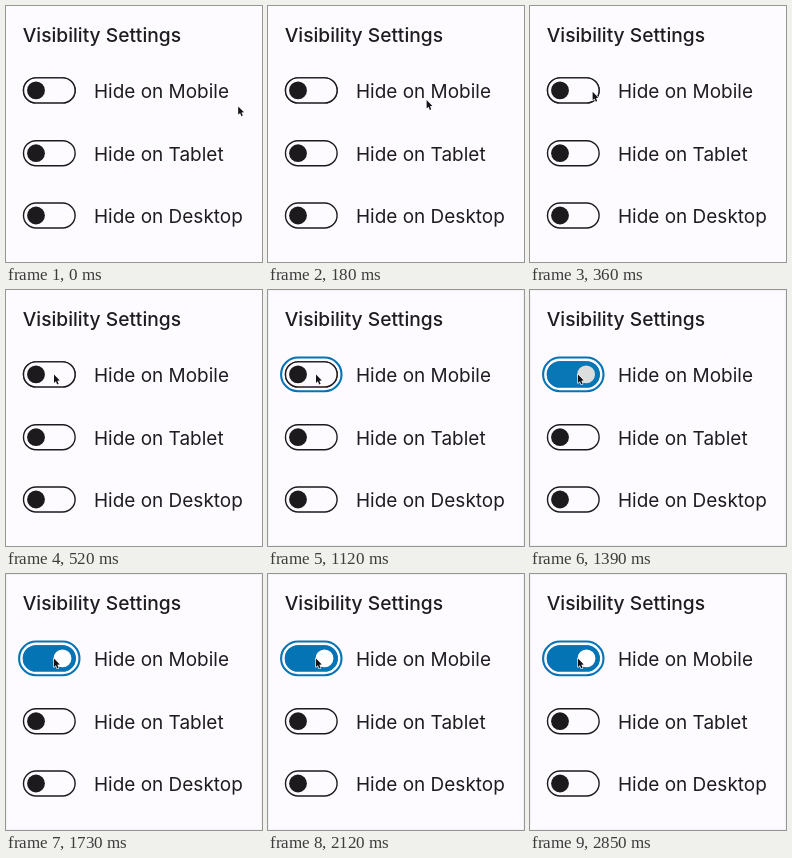
Recreate the animation shown at these times as an HTML page with a canvas. Size 256 by 256 pixels, loop 2.88 s.

```html
<!DOCTYPE html>
<html lang="en">
<head>
<meta charset="utf-8">
<title>Visibility Settings</title>
<style>
  html, body { margin: 0; width: 100%; height: 100%; overflow: hidden; background: #fdfbff; }
  svg, canvas { position: absolute; left: 0; top: 0; width: 100vw; height: 100vh; display: block; }
  text { font: 400 18.98px Inter, sans-serif; font-optical-sizing: none; fill: #1e1c1f; }
  .title { font-weight: 500; font-size: 19.2px; }
</style>
</head>
<body>
<svg viewBox="0 0 256 256">
  <text class="title" x="16.7" y="36">Visibility Settings</text>
  <text x="88" y="91.8">Hide on Mobile</text>
  <text x="88" y="154.8">Hide on Tablet</text>
  <text x="88" y="217">Hide on Desktop</text>
</svg>
<canvas id="stage"></canvas>
<script>
const LOOP = 2880, PRESS = 1110;
const PAPER = [253, 251, 255], INK = [29, 26, 30], BLUE = [5, 116, 180], WHITE = [255, 255, 255];
const LEFT = 16.8, WIDTH = 53, HEIGHT = 26.4;

const canvas = document.getElementById('stage');
const ctx = canvas.getContext('2d');
const dpr = window.devicePixelRatio || 1;
canvas.width = canvas.height = 256 * dpr;

const progress = (t, start, length) => Math.min(1, Math.max(0, (t - start) / length));
const lerp = (a, b, k) => a + (b - a) * k;
const mix = (a, b, k) => `rgb(${a.map((v, i) => Math.round(lerp(v, b[i], k)))})`;

// cubic-bezier(.25, .1, .25, 1)
function ease(x) {
  let lo = 0, hi = 1, p = x;
  for (let i = 0; i < 20; i++) {
    p = (lo + hi) / 2;
    const q = 1 - p;
    if (0.75 * p * q * q + 0.75 * p * p * q + p * p * p < x) lo = p;
    else hi = p;
  }
  const q = 1 - p;
  return 0.3 * p * q * q + 3 * p * p * q + p * p * p;
}

function strokePill(cy, grow, color, width) {
  const h = HEIGHT + 2 * grow;
  ctx.beginPath();
  ctx.roundRect(LEFT - grow, cy - h / 2, WIDTH + 2 * grow, h, h / 2);
  ctx.strokeStyle = color;
  ctx.lineWidth = width;
  ctx.stroke();
}

function toggle(cy, slide = 0, tint = 0, focused = false) {
  if (focused) strokePill(cy, 3.7, `rgb(${BLUE})`, 2.1);
  strokePill(cy, -0.7, mix(INK, BLUE, slide), 1.4);
  if (slide > 0) {
    ctx.fillStyle = mix(PAPER, BLUE, slide);
    ctx.fill();
    ctx.stroke();
  }

  ctx.beginPath();
  ctx.arc(lerp(30, 56.5, slide), cy, 8.9, 0, Math.PI * 2);
  ctx.fillStyle = mix(INK, WHITE, tint);
  ctx.fill();
}

function cursor(x, y) {
  const arrow = [[0, 0], [0, 8.4], [1.9, 6.7], [3.2, 9.8], [4.6, 9.2], [3.3, 6.1], [5.8, 5.9]];
  ctx.beginPath();
  for (const [dx, dy] of arrow) ctx.lineTo(x + dx, y + dy);
  ctx.closePath();
  ctx.lineJoin = 'round';
  ctx.lineWidth = 1.3;
  ctx.strokeStyle = '#fff';
  ctx.stroke();
  ctx.fillStyle = '#141216';
  ctx.fill();
}

function draw(t) {
  ctx.setTransform(dpr, 0, 0, dpr, 0, 0);
  ctx.clearRect(0, 0, 256, 256);

  const pressed = t >= PRESS;
  if (pressed) {
    ctx.strokeStyle = '#f1f0f3';
    ctx.lineWidth = 1;
    ctx.strokeRect(0.5, 0.5, 255, 255);
  }

  toggle(84.4, ease(progress(t, 1290, 120)), ease(progress(t, 1280, 200)), pressed);
  toggle(147.2);
  toggle(209.5);

  // quick start, long settle
  const w = 1 - Math.pow(1 - progress(t, 30, 480), 1.5);
  const move = w * w * (3 - 2 * w);
  cursor(lerp(232.2, 48, move), lerp(100.4, 84.6, move));
}

const begin = performance.now();
function tick() {
  draw((performance.now() - begin) % LOOP);
  requestAnimationFrame(tick);
}
tick();
</script>
</body>
</html>
```
